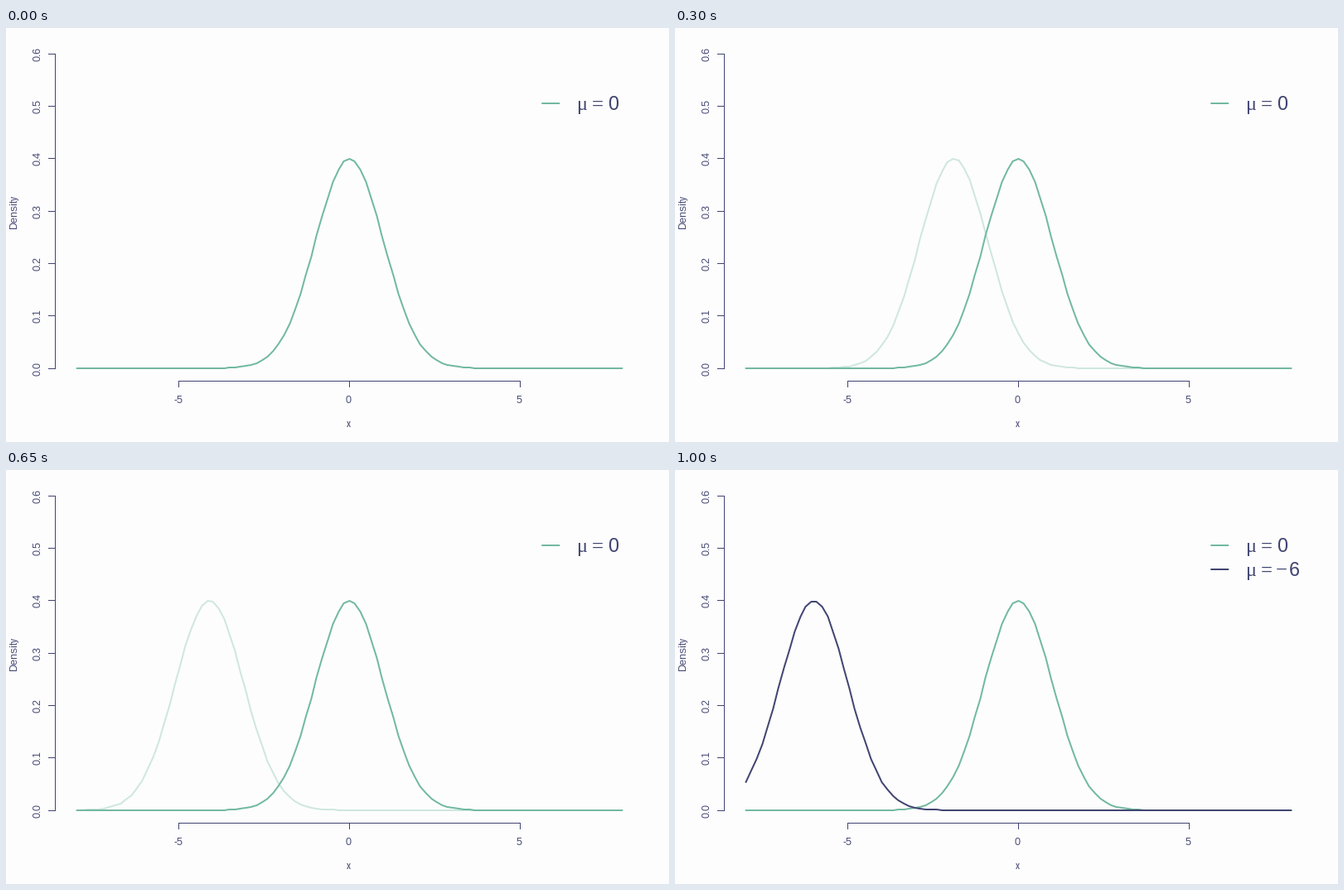
A matplotlib script that plays this animation: 800 by 500 pixels, repeating every 1.05 s.

```python
import numpy as np
import matplotlib.pyplot as plt
from matplotlib.animation import FuncAnimation

W, H, DPI = 800, 500, 100
FRAMES, STEP_MS = 21, 50
MU_END = -6
PAPER, GREEN, FAINT, NAVY = "#fdfdfd", "#72b9a0", "#cfe7de", "#414572"
SANS, SERIF = "Liberation Sans", "Liberation Serif"

# crisp glyphs with whole-pixel advances
plt.rcParams.update({"text.hinting": "native", "text.hinting_factor": 1})

fig = plt.figure(figsize=(W / DPI, H / DPI), dpi=DPI, facecolor=PAPER)
ax = fig.add_axes([0, 0, 1, 1])
ax.set_xlim(0, W)
ax.set_ylim(H, 0)
ax.axis("off")


def px(x):
    return np.floor(414.4 + 41.13 * np.asarray(x))


def py(y):
    return np.floor(411.35 - 633.8 * np.asarray(y))


def rule(x0, y0, x1, y1):
    """One-pixel line through pixel centres."""
    ax.plot([x0 + 0.5, x1 + 0.5], [y0 + 0.5, y1 + 0.5], color=NAVY, lw=0.72,
            solid_capstyle="projecting", snap=False)


def stroke(x, y, color, z=3):
    """Two-pixel line, centred on pixel columns."""
    return ax.plot(np.asarray(x) + 0.5, y, color=color, lw=1.44,
                   solid_capstyle="round", solid_joinstyle="round",
                   snap=False, zorder=z)[0]


def label(x, y, s, size=12, font=SANS, **kw):
    return ax.text(x, y, s, fontsize=size * 0.72, family=font, color=NAVY, **kw)


def upright(x, y, s):
    """Label turned to read upwards, with its baseline at x."""
    label(x, y, s, rotation=90, rotation_mode="anchor",
          ha="center", va="baseline")


def legend(y, color, value):
    """Key line and 'mu = value'."""
    base = y + 8
    parts = [stroke([646.5, 667], [y, y], color),
             label(688, base, "\u03bc", 24, SERIF),
             label(707, base, "=", 24, SERIF)]
    x = 726
    if value < 0:
        parts.append(label(725, base, "\u2212", 24, SERIF))
        x = 741
    parts.append(label(x, base, str(abs(value)), 24))
    return parts


grid = np.linspace(-8, 8, 101)


def density(mu):
    return py(np.exp(-(grid - mu) ** 2 / 2) / np.sqrt(2 * np.pi))


# axes
rule(59, py(0), 59, py(0.6))
for v in np.arange(7) / 10:
    rule(51, py(v), 59, py(v))
    upright(42, py(v) + 0.5, f"{v:.1f}")
rule(px(-5), 426, px(5), 426)
for v in (-5, 0, 5):
    rule(px(v), 426, px(v), 433)
    label(px(v) - 0.5, 453, str(v), ha="center")
label(413.5, 482, "x", ha="center")
upright(13, 221, "Density")

# curves
stroke(px(grid), density(0), GREEN)
legend(91, GREEN, 0)
ghost = stroke(px(grid), density(0), FAINT, z=2)
final = [stroke(px(grid), density(MU_END), NAVY, z=4)] + legend(120, NAVY, MU_END)


def update(i):
    done = i == FRAMES - 1
    ghost.set_ydata(density(MU_END * i / (FRAMES - 2)))
    ghost.set_visible(0 < i and not done)
    for part in final:
        part.set_visible(done)
    return [ghost, *final]


anim = FuncAnimation(fig, update, frames=FRAMES, interval=STEP_MS,
                     init_func=lambda: update(0), repeat=True, repeat_delay=0)
plt.show()
```
